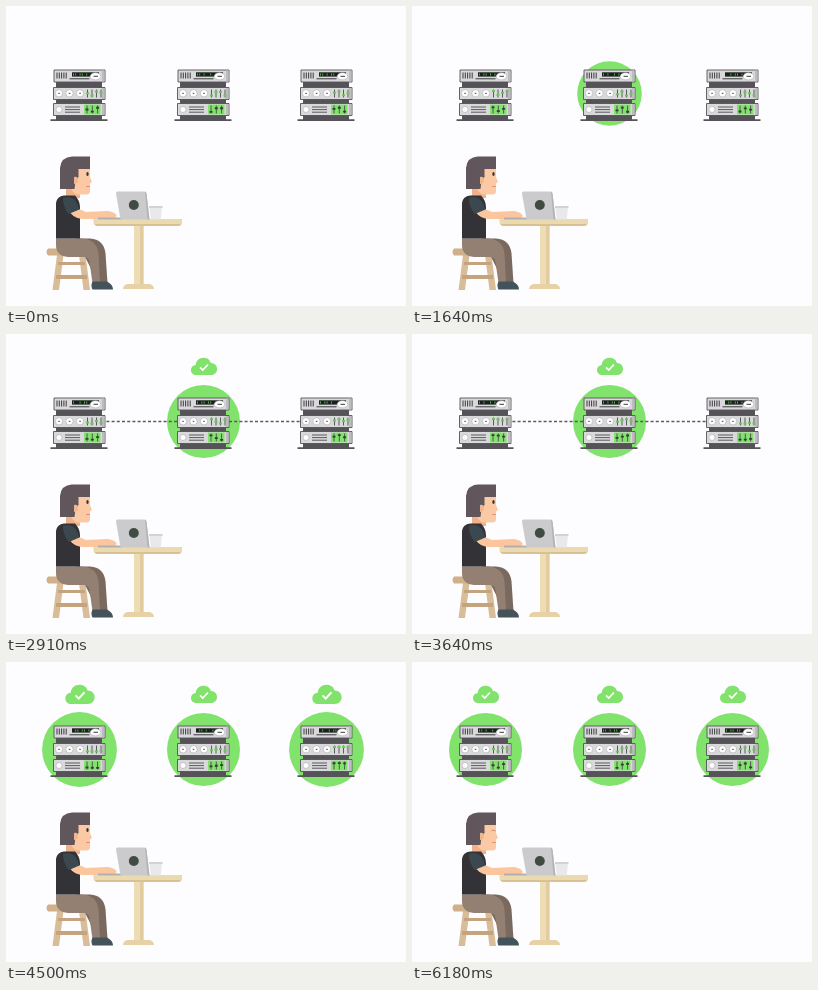
These frames come from a looping animation (400 px wide and 300 px high, 6.22 s). An HTML page:

```html
<!DOCTYPE html>
<html lang="en">
<head>
<meta charset="utf-8">
<title>Sync to servers</title>
<style>
html, body { margin: 0; width: 100%; height: 100%; overflow: hidden; background: #fdfcff; }
svg { display: block; width: 100vw; height: 100vh; }
.dash { fill: none; stroke: #5c5a5e; stroke-width: 1.5; stroke-dasharray: 3 2.2; }
.case { fill: #d9d8da; stroke: #555357; stroke-width: .9; }
.dark { fill: #555357; }
.ink { fill: none; stroke: #3c3a3e; }
.green { fill: #81e36c; }
</style>
</head>
<body>
<svg viewBox="0 0 400 300">
  <defs>
    <g id="chassis">
      <path class="dark" d="M-23 75h46v7h-46zM-23 93h46v5h-46zM-23 109h46v5h-46zM-28.500 113.300h57v1.800h-57z"/>
      <path class="case" d="M-25 64h51v12h-51zM-25.500 81.500h51.500v12h-51.500zM-25.500 97.500h51.500v12h-51.500z"/>
      <path fill="#bdbbbf" d="M23 64.500h2.500v11h-2.500zM23 82h2.500v11h-2.500zM23 98h2.500v11h-2.500z"/>
      <path class="ink" stroke-width="1" d="M-22 66.500v6M-19.700 66.500v6M-17.400 66.500v6M-15.100 66.500v6M-12.800 66.500v6M-9.500 72.800h20"/>
      <path fill="#19211b" d="M-7 66.300h27v4.300h-27z"/>
      <g fill="#fff" stroke="#aaa8ac" stroke-width=".6">
        <ellipse cx="16.500" cy="70.300" rx="5.300" ry="3.600"/>
        <circle cx="-20" cy="87.300" r="3.700"/>
        <circle cx="-9.500" cy="87.300" r="3.700"/>
        <circle cx="1" cy="87.300" r="3.700"/>
        <circle cx="-20" cy="103.500" r="3"/>
      </g>
      <path class="ink" d="M14.500 70.300h4.500M-20.700 87.300h1.500M-10.200 87.300h1.500M.3 87.300h1.500" stroke-width="1"/>
      <path class="ink" d="M-14 101h15M-14 103.600h15M-14 106.200h15" stroke-width=".8"/>
      <path class="green" d="M5 98.500h16.500v10h-16.500z"/>
    </g>
    <g id="cloudShape">
      <path class="green" d="M-7.500 8.500C-11 8.500-13 6.300-13 3.500-13 .8-11-1.300-8.300-1.500-8-6-4.500-8.700-.5-8.700 3.500-8.700 6-6.500 6.800-3.500 10.500-3.500 13-1 13 2.500 13 6 10.500 8.500 7 8.500z"/>
      <path d="M-4 .8-1.200 3.600 4-2" fill="none" stroke="#fff" stroke-width="1.700"/>
    </g>
    <g id="folderShape">
      <path d="M-7-9H2l3 3v8H-7z" fill="#fff" stroke="#77757a" stroke-width=".8"/>
      <path d="M-1-7.500h7l2 2v8h-9z" fill="#fff" stroke="#77757a" stroke-width=".8"/>
      <path d="M-10.200-5h5l1.500 2h13.900V8.700h-20.400z" fill="#7be366" stroke="#4d8f43" stroke-width=".8"/>
    </g>
  </defs>

  <g id="halos"></g>
  <path id="upLine" class="dash"/>
  <path id="leftLine" class="dash"/>
  <path id="rightLine" class="dash"/>
  <g id="folders"></g>
  <g id="servers"></g>
  <g id="clouds"></g>

  <!-- stool -->
  <path d="M51 249h6.500l-4.500 35h-6.500zM73 249h6.500l4.500 35h-6.500z" fill="#d8bd98"/>
  <path d="M52 256h27v3H52zM50 269h31v4H50z" fill="#c4a47f"/>
  <path d="M42 242.500h43q2 3.500 0 7H42q-3-3.500 0-7z" fill="#cfb08a"/>

  <!-- person -->
  <path d="M60 176h14v16H60z" fill="#eeb189"/>
  <path d="M70 232.500h14q14 1 15.500 15l2 29.500H92z" fill="#7a695e"/>
  <path d="M50 232.500h26q15 1 16.500 15l1.500 29.500h-7.500l-3-21q-.5-5-6-5H62q-12-1-12-12z" fill="#948072"/>
  <path d="M86.500 275.500H101q6 3 6 8H86.500q-2-4 0-8z" fill="#44535a"/>
  <path d="M50 197q1-7 8-7.500h11q5 5 5 12v31H50z" fill="#333236"/>
  <path d="M62 203h11l7 3 22-1q7 1 9 5l-3 3H76q-10-1-14-10z" fill="#fbc59d"/>
  <path d="M57 191.500q9-2 13 4l3.500 8-11 4.500q-6-8-5.500-16.500z" fill="#3c484f"/>
  <path d="M68 160h16v11l2 5-2 1.500v8q0 3-4 3H70q-6-4-6-12z" fill="#fbc9a3"/>
  <path d="M54 162q1-11 12-11.500H84V163H72.500v8l-3 4-1 8H54z" fill="#61565b"/>
  <path d="M68 171q4-1 4 3t-4 4z" fill="#f3b58d"/>
  <path d="M80 180.500h4" stroke="#e08f7c"/>
  <ellipse id="eye" cx="81.500" cy="168" rx="1.200" ry="2" fill="#39343a"/>
  <path id="eyeShut" d="M79.500 169q2-2 4 0" fill="none" stroke="#b4795f" stroke-width=".8"/>

  <!-- table -->
  <path d="M128 219h9.500v60H128z" fill="#eddcb4"/>
  <path d="M134 219h3.500v60H134z" fill="#e2cc9f"/>
  <path d="M121 278h23q4 1.500 4 5h-31q0-3.500 4-5z" fill="#e6d2a6"/>
  <path d="M87.500 213H176v4.500q-1 2.500-3 2.500H90.500q-3-1-3-3z" fill="#ebd9b0"/>
  <path d="M88.500 218H175l-2 2H90.500z" fill="#d8c194"/>

  <!-- laptop and cup -->
  <path d="M92 211.500h24v2H92z" fill="#b0b0b2"/>
  <path d="M111.500 185.500h26.500q2 0 2.500 2l3 26h-29l-4.500-26q0-2 1.500-2z" fill="#cbcbcd"/>
  <path d="M139 185.500q1 0 1.500 2l3 26h-2z" fill="#b4b4b6"/>
  <circle cx="127.800" cy="199" r="5" fill="#3f4b43"/>
  <path d="M143.500 201h12.500l-1.300 12.500h-9.900z" fill="#e9e8ea"/>
  <path d="M143 200h13.500v2H143z" fill="#d3d2d5"/>
</svg>
<script>
const LOOP = 6220, SPRING = 1680, RADIUS = 36.5;
const CENTER_HIT = 1200, SIDE_HIT = 3685, CLOUD_DELAY = 480;
const CORNER = 42, ROUTE = 153;

const byId = id => document.getElementById(id);
const clamp = v => Math.max(0, Math.min(1, v));
const span = (t, from, to) => clamp((t - from) / (to - from));
const easeInOut = p => (1 - Math.cos(Math.PI * p)) / 2;
const elastic = p => p <= 0 ? 0 : p >= 1 ? 1
  : 1 + 2 ** (-10 * p) * Math.sin((p - 0.075) * Math.PI * 2 / 0.3);

function add(parent, tag, attrs = {}) {
  const node = document.createElementNS('http://www.w3.org/2000/svg', tag);
  for (const key in attrs) node.setAttribute(key, attrs[key]);
  return parent.appendChild(node);
}

const stations = [73.5, 197.5, 320.5].map((x, i) => {
  const rack = add(byId('servers'), 'g', { transform: `translate(${x - 0.5} 0)` });
  add(rack, 'use', { href: '#chassis' });
  return {
    x,
    seed: i * 1.7,
    hit: i === 1 ? CENTER_HIT : SIDE_HIT,
    halo: add(byId('halos'), 'circle', { class: 'green', cx: x, cy: 87.5 }),
    cloud: add(byId('clouds'), 'use', { href: '#cloudShape' }),
    lights: add(rack, 'path', { stroke: '#5fae50', 'stroke-width': 1 }),
    rails: add(rack, 'path', {
      class: 'ink', 'stroke-width': 0.8,
      d: 'M8.500 83.500v8M13 83.500v8M17.500 83.500v8M22 83.500v8M8 99.500v8M13.300 99.500v8M18.600 99.500v8'
    }),
    topKnobs: add(rack, 'path', { stroke: '#6cc45a', 'stroke-width': 2 }),
    lowKnobs: add(rack, 'path', { class: 'ink', 'stroke-width': 1.8 })
  };
});
const folders = [0, 1, 2].map(() => add(byId('folders'), 'use', { href: '#folderShape' }));

function knobRow(s, t, count, left, gap, mid) {
  return Array.from({ length: count }, (_, k) => {
    const wave = Math.sin(t / LOOP * Math.PI * 2 * (3 + k % 3) + k * 2 + s.seed);
    return `M${left + k * gap - 1.5} ${mid + wave * 2.3}h3`;
  }).join('');
}

function drawStation(s, t) {
  s.halo.setAttribute('r', RADIUS * elastic((t - s.hit) / SPRING));
  const size = elastic((t - s.hit - CLOUD_DELAY) / SPRING);
  s.cloud.setAttribute('transform', `translate(${s.x + 0.5} 32.500) scale(${size})`);

  const beat = Math.floor(t / 200);
  let lights = '';
  for (let k = 0; k < 8; k++) {
    if (Math.sin(beat * 1.9 + k * 2.3 + s.seed * 4) > -0.2) lights += `M${-5.5 + k * 2.2} 67.500v2`;
  }
  s.lights.setAttribute('d', lights);
  s.topKnobs.setAttribute('d', knobRow(s, t, 4, 8.5, 4.5, 87.3));
  s.lowKnobs.setAttribute('d', knobRow(s, t, 3, 8, 5.3, 103.5));
}

function placeFolder(node, x, y, progress) {
  const size = progress >= 1 ? 0 : clamp(progress * 8);
  node.setAttribute('transform', `translate(${x} ${y}) scale(${size})`);
}

function drawLine(id, d, t, hit) {
  const line = byId(id);
  line.setAttribute('d', d);
  line.setAttribute('opacity', 1 - span(t, hit, hit + 150));
}

function drawUpload(t) {
  const len = ROUTE * easeInOut(span(t, 150, 550));
  const rise = Math.max(0, len - CORNER);
  drawLine('upLine', `M155 201h${Math.min(len, CORNER)}v${-rise}`, t, CENTER_HIT);
  const p = span(t, 560, CENTER_HIT);
  const gone = ROUTE * easeInOut(p);
  placeFolder(folders[0], 155 + Math.min(gone, CORNER), 201 - Math.max(0, gone - CORNER), p);
}

function drawSpread(t) {
  const reach = easeInOut(span(t, 2580, 2890));
  const p = span(t, 3045, SIDE_HIT);
  const moved = 123 * easeInOut(p);
  [['leftLine', -1], ['rightLine', 1]].forEach(([id, dir], i) => {
    drawLine(id, `M197 87.500h${dir * 110 * reach}`, t, SIDE_HIT);
    placeFolder(folders[i + 1], 197 + dir * moved, 87.5, p);
  });
}

function drawFace(t) {
  const shut = t > 4700 || (t > 850 && t < 980);
  byId('eye').setAttribute('opacity', shut ? 0 : 1);
  byId('eyeShut').setAttribute('opacity', shut ? 1 : 0);
}

function render(now) {
  const t = now % LOOP;
  stations.forEach(s => drawStation(s, t));
  drawUpload(t);
  drawSpread(t);
  drawFace(t);
}

const start = performance.now();
function tick() {
  render(performance.now() - start);
  requestAnimationFrame(tick);
}
tick();
</script>
</body>
</html>
```
